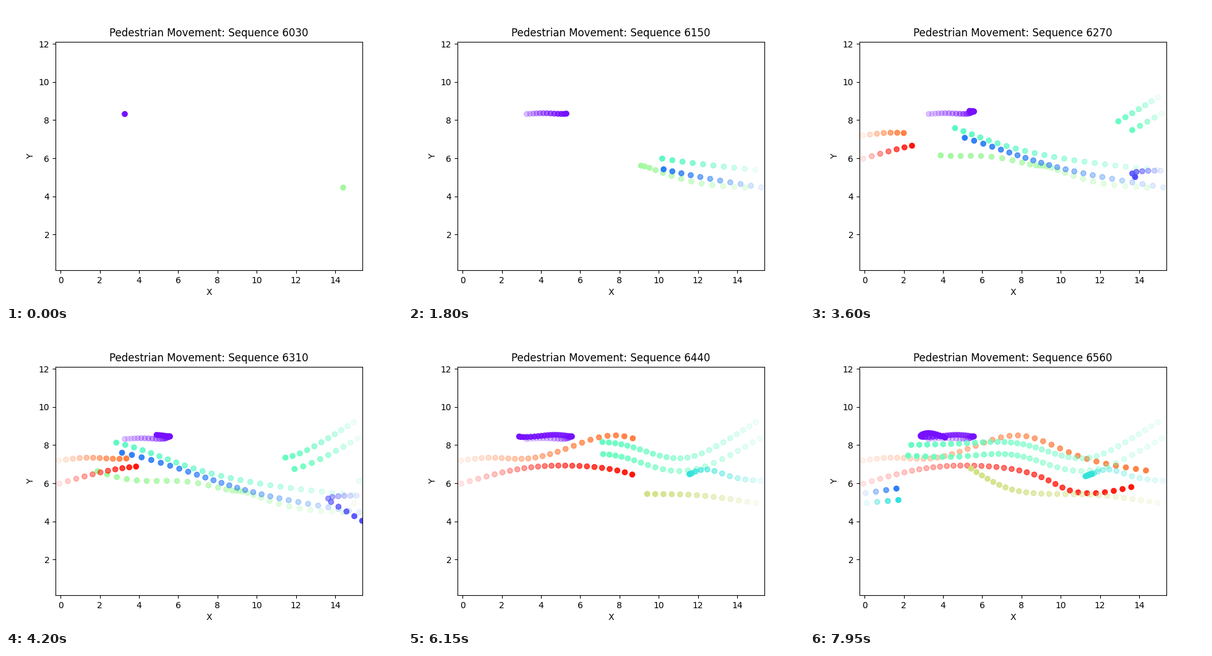
Write a matplotlib script that moves like this. It is 640x480 px and loops after 8000 ms.

```python
import matplotlib.pyplot as plt
import numpy as np
from matplotlib.animation import FuncAnimation

STEPS_PER_SAMPLE = 3
TOTAL_FRAMES = 160
INTERVAL = 50

plt.rcParams["font.family"] = "DejaVu Sans"
fig, ax = plt.subplots(figsize=(6.4, 4.8), dpi=100)
ax.set(xlim=(-0.264, 15.392), ylim=(0.12, 12.117), xlabel="X", ylabel="Y")
title = ax.set_title("")
walkers = []


def natural_spline(times, knots):
    """Natural cubic spline through (time, x, y) knots."""
    def basis(t):
        return np.abs(t[:, None] - knots[:, 0]) ** 3

    def line(t):
        return np.c_[np.ones_like(t), t]

    trend = line(knots[:, 0])
    system = np.block([[basis(knots[:, 0]), trend],
                       [trend.T, np.zeros((2, 2))]])
    weights = np.linalg.solve(system, np.r_[knots[:, 1:], np.zeros((2, 2))])
    return np.c_[basis(times), line(times)] @ weights


def add_walker(hue, *knots):
    knots = np.array(knots, dtype=float)
    times = np.arange(knots[0, 0], knots[-1, 0] + 1)
    if times[0] == 0:
        times = np.r_[0, times]  # the opening sample is recorded twice
    dots = ax.scatter([], [])
    walkers.append((dots, plt.cm.rainbow(hue), times,
                    natural_spline(times, knots)))


# violet: strolls right, turns back, turns again
add_walker(0.02, (0, 3.27, 8.32), (6, 4.29, 8.36), (12, 5.29, 8.34),
           (16, 5.51, 8.45), (20, 5.57, 8.45), (30, 4.62, 8.54),
           (36, 3.66, 8.45), (41, 2.88, 8.45), (46, 3.16, 8.63),
           (53, 4.1, 8.4))

# light green, blue and turquoise: right to left
add_walker(0.57, (0, 14.41, 4.46), (5, 11.66, 4.78), (9, 9.84, 5.38),
           (12, 9.1, 5.61), (14, 8.75, 5.62), (19, 6.47, 6.08),
           (24, 3.88, 6.15), (28, 1.88, 6.63), (32, 0.05, 7.45))
add_walker(0.165, (2, 15.23, 4.47), (12, 10.25, 5.42), (19, 7.38, 6.3),
           (28, 3.13, 7.6), (33, 0.78, 8.08), (36, -0.26, 8.5))
add_walker(0.43, (3, 14.92, 5.39), (12, 10.18, 5.98), (19, 6.78, 6.78),
           (28, 2.84, 8.13), (33, 0.73, 8.68), (36, 0.06, 9.3))

# orange and red: left to right
add_walker(0.83, (18, -0.09, 7.19), (22, 1.32, 7.34), (28, 3.35, 7.3),
           (33, 5.25, 7.8), (39, 7.82, 8.51), (46, 10.87, 7.44),
           (53, 14.35, 6.67))
add_walker(0.97, (18, -0.07, 5.98), (23, 2.03, 6.57), (33, 5.59, 6.92),
           (43, 9.38, 6.15), (46, 10.47, 5.62), (49, 11.8, 5.48),
           (53, 13.6, 5.8))

# indigo: enters, then turns back out
add_walker(0.1, (18, 15.1, 5.35), (22, 13.86, 5.28), (23, 13.65, 5.2),
           (25, 14.17, 4.77), (28, 15.38, 4.03))

# two mint walkers side by side
add_walker(0.45, (18, 14.95, 9.2), (23, 13.3, 8.15), (27, 11.83, 7.43),
           (30, 10.75, 7.32), (36, 8.72, 7.88), (42, 6.78, 8.17),
           (46, 5.22, 8.1), (53, 2.38, 8.01))
add_walker(0.46, (20, 15.15, 8.35), (24, 13.65, 7.48), (28, 11.93, 6.75),
           (30, 11.05, 6.64), (36, 8.75, 7.2), (43, 6.47, 7.53),
           (47, 4.83, 7.4), (53, 2.22, 7.45))

# cyan: enters, then slows to a halt
add_walker(0.35, (28, 15.21, 6.13), (32, 13.63, 6.37), (35, 12.48, 6.72),
           (38, 11.7, 6.53), (41, 11.58, 6.48), (53, 11.27, 6.37))

# olive: right to left
add_walker(0.66, (28, 14.95, 4.96), (36, 11.52, 5.4), (46, 7.52, 5.67),
           (49, 6.56, 6.07), (53, 5.43, 6.77))

# two late arrivals on the left
add_walker(0.165, (50, 0.05, 5.48), (53, 1.62, 5.72))
add_walker(0.34, (50, 0.1, 4.97), (53, 1.72, 5.12))


def update(frame):
    sample = frame // STEPS_PER_SAMPLE
    title.set_text(f"Pedestrian Movement: Sequence {6030 + 10 * sample}")
    for dots, color, times, path in walkers:
        present = times[0] <= sample <= times[-1]
        dots.set_visible(bool(present))
        if present:
            trail = path[times <= sample]
            colors = np.tile(color, (len(trail), 1))
            colors[:, 3] = np.linspace(0.1, 1, len(trail))
            dots.set_offsets(trail)
            dots.set_color(colors)


animation = FuncAnimation(fig, update, frames=TOTAL_FRAMES, interval=INTERVAL,
                          repeat=True, repeat_delay=0)
plt.show()
```
